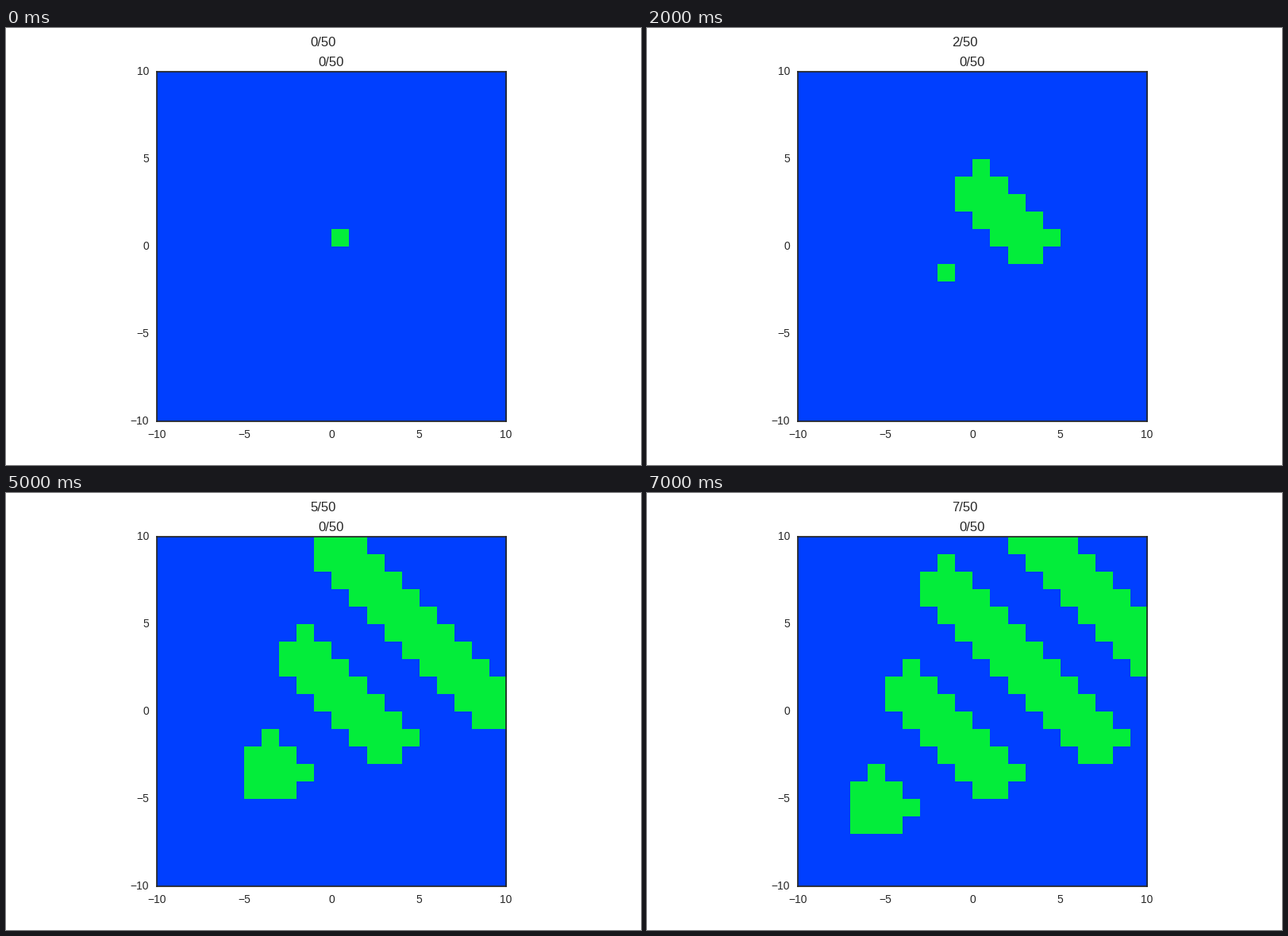
Write a matplotlib script that moves like this. It is 800 by 550 pixels and loops after 8000 ms.

```python
import matplotlib.pyplot as plt
import numpy as np
from matplotlib.animation import FuncAnimation
from matplotlib.colors import ListedColormap

INK = "#262626"
BLUE, GREEN = "#003FFF", "#03ED3A"
HALF = 10      # the grid runs from -HALF to HALF
STEPS = 8
TOTAL = 50

plt.rcParams.update({
    "font.family": "Liberation Sans",
    "text.color": INK,
    "axes.edgecolor": INK,
    "axes.linewidth": 1.25,
    "axes.unicode_minus": True,
})

Y, X = np.mgrid[-HALF:HALF, -HALF:HALF]


def wave(x, y, age):
    """Cells of a diagonal front that left (0, 0) `age` steps ago."""
    if age == 0:
        return (x == 0) & (y == 0)
    reach = 2 * age
    band = (x + y >= reach - 3) & (x + y <= reach)
    cells = band & (abs(x - y) <= reach) & (x >= -1) & (y >= -1)
    if age == 1:
        cells |= (x == -1) & (y == -1)
    return cells


def grid(step):
    """A new front starts every second step, two cells further down-left."""
    cells = np.zeros(X.shape, bool)
    for birth in range(0, step + 1, 2):
        cells |= wave(X + birth, Y + birth, step - birth)
    return cells.astype(int)


fig = plt.figure(figsize=(8, 5.5), dpi=100, facecolor="white")
ax = fig.add_axes([0.2375, 0.1, 0.55, 0.8])
image = ax.imshow(grid(0), cmap=ListedColormap([BLUE, GREEN]), vmin=0, vmax=1,
                  origin="lower", extent=(-HALF, HALF, -HALF, HALF),
                  interpolation="nearest", aspect="auto")

ticks = range(-HALF, HALF + 1, 5)
ax.set_xticks(ticks)
ax.set_yticks(ticks)
ax.tick_params(length=0, pad=7, labelsize=10, labelcolor=INK)
for label in ax.get_yticklabels():
    label.set_va("center")

ax.set_title(f"0/{TOTAL}", fontsize=12, y=1.0, pad=5)
counter = fig.suptitle(f"0/{TOTAL}", fontsize=12, y=0.98)


def update(step):
    image.set_data(grid(step))
    counter.set_text(f"{step}/{TOTAL}")
    return image, counter


anim = FuncAnimation(fig, update, frames=STEPS, interval=1000,
                     repeat=True, repeat_delay=0, blit=False)
plt.show()
```
